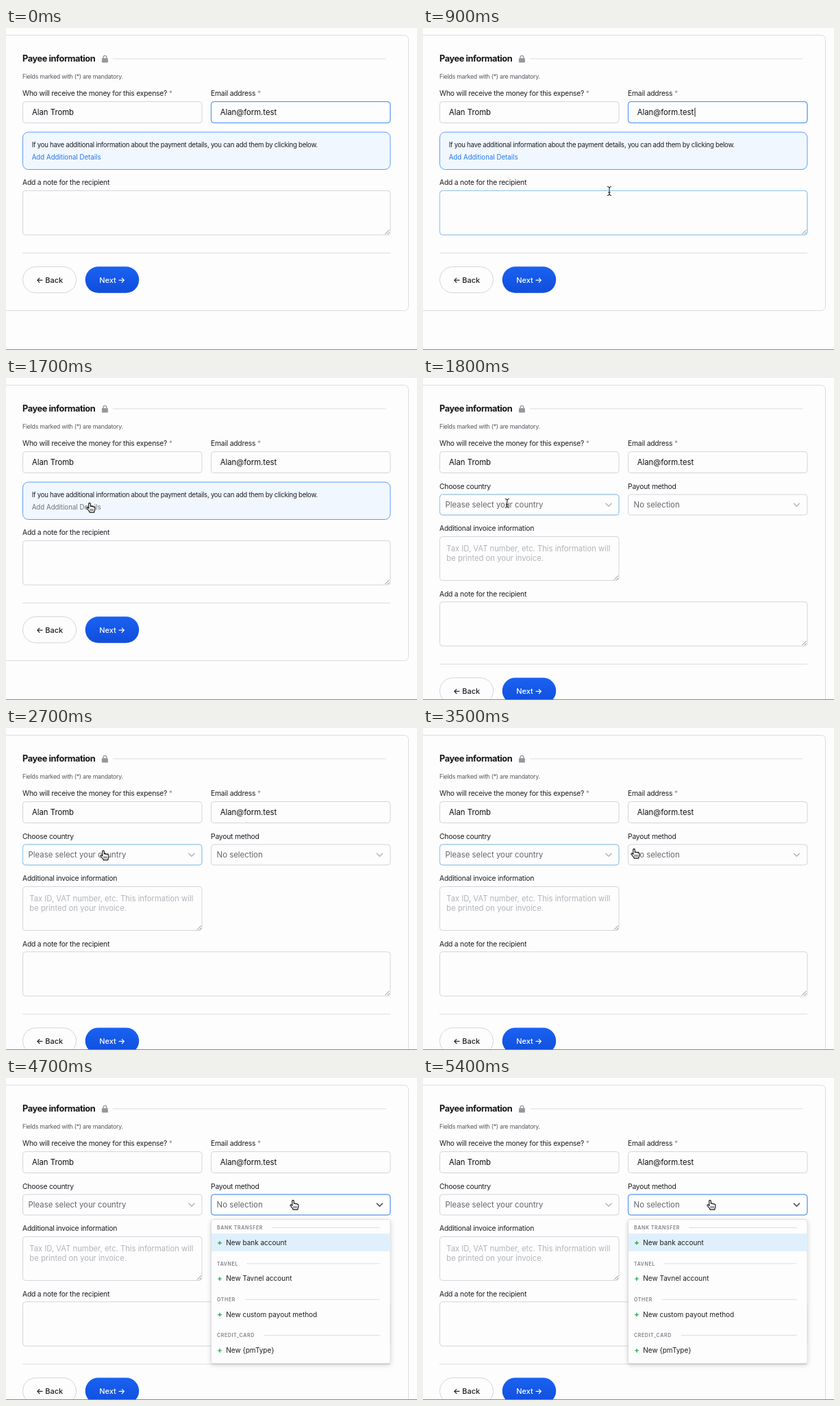
Animation of 600x470 px, one loop 5.5 s. Source, as an HTML page:

```html
<!DOCTYPE html>
<html lang="en">
<head>
<meta charset="utf-8">
<title>Payee form</title>
<style>
html, body { margin: 0; width: 100%; height: 100%; overflow: hidden; background: #fdfdfe; }
svg { display: block; width: 600px; height: 470px; }
text { font-family: Inter, "Liberation Sans", sans-serif; fill: #1c1e21; }
.title { font-size: 12.8px; font-weight: 700; letter-spacing: -.43px; fill: #141619; }
.hint { font-size: 8.8px; letter-spacing: -.26px; fill: #55585d; }
.label { font-size: 10.35px; letter-spacing: -.225px; }
.label tspan { fill: #8d9095; }
.value { font-size: 11.3px; fill: #0c0d0f; }
.pick { font-size: 11.37px; fill: #63666b; }
.ghost { font-size: 11.24px; fill: #b2b5b9; }
.info { font-size: 9.65px; letter-spacing: -.26px; }
.link { font-size: 9.7px; fill: #2178f0; }
.btn { font-size: 11px; font-weight: 500; }
.group { font-size: 7px; font-weight: 600; letter-spacing: .63px; fill: #7c7f84; }
.option { font-size: 10.03px; }
.line { stroke: #dadce0; fill: none; }
.box { fill: #fdfdfe; stroke: #d2d5d9; }
.hover { fill: none; stroke: #8cc5f0; }
.focus { fill: none; stroke: #3f8cf3; }
.chev { fill: none; stroke: #b4b7bb; stroke-width: 1.6; stroke-linecap: round; stroke-linejoin: round; }
.arrow { fill: none; stroke: #25272a; stroke-width: 1.2; stroke-linecap: round; stroke-linejoin: round; }
</style>
</head>
<body>
<svg id="stage" viewBox="0 0 600 470">
  <defs>
    <linearGradient id="blue" x1="0" y1="0" x2="0" y2="1">
      <stop offset="0" stop-color="#1a62f2"/><stop offset="1" stop-color="#104dda"/>
    </linearGradient>
    <filter id="shadow" x="-10%" y="-10%" width="120%" height="125%">
      <feDropShadow dx="0" dy="2" stdDeviation="3" flood-color="#000" flood-opacity=".18"/>
    </filter>
  </defs>
  <rect id="card" class="line" x="-12" y="10.5" width="599.5" height="402" rx="6"/>

  <text class="title" x="24" y="49.2">Payee information</text>
  <path d="M142 44.5v-1.7a2.4 2.4 0 0 1 4.8 0v1.7" fill="none" stroke="#95989c" stroke-width="1.3"/>
  <rect x="139.9" y="44" width="9" height="6.5" rx="1.2" fill="#95989c"/>
  <path class="line" d="M156 44.9H554.5"/>
  <text class="hint" x="24" y="74.4">Fields marked with (*) are mandatory.</text>
  <text class="label" x="24" y="98.8">Who will receive the money for this expense? <tspan>*</tspan></text>
  <text class="label" x="299" y="98.8">Email address <tspan>*</tspan></text>
  <rect class="box" x="24.5" y="107.5" width="261.5" height="31" rx="4"/>
  <rect class="box" x="299.5" y="107.5" width="261.5" height="31" rx="4"/>
  <rect id="emailFocus" class="focus" x="299.5" y="107.5" width="261.5" height="31" rx="4"/>
  <text class="value" x="38" y="127.1">Alan Tromb</text>
  <text class="value" x="312.7" y="127.1">Alan@form.test</text>
  <path id="caret" d="M397 116.5v13" stroke="#141619"/>

  <g id="notice">
    <rect x="24.5" y="152" width="536.5" height="54.5" rx="8" fill="#f1f7ff" stroke="#5d9ef3"/>
    <text class="info" x="37.7" y="174">If you have additional information about the payment details, you can add them by clicking below.</text>
    <text id="link" class="link" x="37.7" y="191.5">Add Additional Details</text>
  </g>

  <g id="details">
    <text class="label" x="24" y="161.5">Choose country</text>
    <text class="label" x="299" y="161.5">Payout method</text>
    <rect class="box" x="24.5" y="170" width="261.5" height="30" rx="4"/>
    <rect class="box" x="299.5" y="170" width="261.5" height="30" rx="4"/>
    <rect id="countryHover" class="hover" x="24.5" y="170" width="261.5" height="30" rx="4"/>
    <rect id="payoutHover" class="hover" x="299.5" y="170" width="261.5" height="30" rx="4"/>
    <rect id="payoutFocus" class="focus" x="299.5" y="170" width="261.5" height="30" rx="4"/>
    <text class="pick" x="32.6" y="189.1">Please select your country</text>
    <text class="pick" x="307.6" y="189.1">No selection</text>
    <path class="chev" d="M267 183.2l4 4 4-4"/>
    <path id="payoutChev" class="chev" d="M541.5 183.2l4 4 4-4"/>
    <text class="label" x="24" y="222.8">Additional invoice information</text>
    <rect class="box" x="24.5" y="231.5" width="261.5" height="64" rx="4"/>
    <path d="M279 294.5l6-6M282.5 294.5l2.5-2.5" stroke="#777" stroke-width=".9"/>
    <text class="ghost" x="34.3" y="252.6">Tax ID, VAT number, etc. This information will</text>
    <text class="ghost" x="34.3" y="266.6">be printed on your invoice.</text>
  </g>

  <g id="lower">
    <text class="label" x="24" y="229.4">Add a note for the recipient</text>
    <rect class="box" x="24.5" y="237.5" width="536.5" height="64.5" rx="4"/>
    <rect id="noteHover" class="hover" x="24.5" y="237.5" width="536.5" height="64.5" rx="4"/>
    <path d="M553.5 300.8l6-6M557 300.8l2.5-2.5" stroke="#777" stroke-width=".9"/>
    <path class="line" d="M24 328.5H561"/>
    <rect class="box" x="24.5" y="348.5" width="78" height="38" rx="19"/>
    <path class="arrow" d="M53 368.2H45.8M48.9 365.1l-3.1 3.1 3.1 3.1"/>
    <text class="btn" x="57.2" y="372">Back</text>
    <rect x="115.7" y="348.2" width="78.5" height="38.6" rx="19.3" fill="url(#blue)"/>
    <text class="btn" x="136.2" y="372" style="fill:#fff">Next</text>
    <path class="arrow" style="stroke:#fff" d="M165 368.2H172.4M169.3 365.1l3.1 3.1-3.1 3.1"/>
  </g>

  <g id="menu">
    <rect x="299.5" y="206.5" width="261.5" height="210" rx="3" fill="#fdfdfe" stroke="#d5d7da" stroke-width=".8" filter="url(#shadow)"/>
    <rect x="300" y="227" width="260.6" height="26" fill="#dff0fc"/>
  </g>
  <path d="M0 469.5H600" stroke="#858a88"/>

  <g id="ibeam" fill="none" stroke-linecap="round">
    <path d="M-2.6-6.5Q0-6.5 0-4.5V4.5Q0 6.5-2.6 6.5M2.6-6.5Q0-6.5 0-4.5M0 4.5Q0 6.5 2.6 6.5" stroke="#fff" stroke-width="2"/>
    <path d="M-2.6-6.5Q0-6.5 0-4.5V4.5Q0 6.5-2.6 6.5M2.6-6.5Q0-6.5 0-4.5M0 4.5Q0 6.5 2.6 6.5M-1.3 2H1.3" stroke="#111"/>
  </g>
  <g id="hand" stroke="#111" stroke-width="1.15" stroke-linejoin="round" stroke-linecap="round">
    <path fill="#fff" d="M-1.3 1.2C-1.3-.6 1.3-.6 1.3 1.2L1.5 5C1.8 4.2 3.6 4.2 3.8 5.4 4.3 4.6 5.8 4.8 6 6 6.6 5.4 7.9 5.8 7.9 7L7.7 10C7.5 11.5 6.8 12 6.8 13.6H.2C0 12-2 10.5-3.8 8-4.6 6.8-3 5.8-1.9 7L-1.1 8Z"/>
    <path d="M1.1 8.7v2.6M3.1 8.7v2.6M5.1 8.7v2.6" stroke-width=".8"/>
  </g>
  <path id="pointer" d="M0 0V12.2L2.8 9.6 4.7 14 6.7 13.1 4.8 8.9H8.6Z" fill="#111" stroke="#fff" stroke-width=".9"/>
</svg>
<script>
const LOOP = 5500, STEP = 100;
const $ = id => document.getElementById(id);

// start, cursor, x, y
const moves = [
  [0, "", 0, 0],
  [400, "pointer", 312, 324], [500, "ibeam", 302, 296], [600, "ibeam", 292, 274],
  [700, "ibeam", 282, 256], [800, "ibeam", 275, 244], [900, "ibeam", 272, 238],
  [1000, "pointer", 236, 224], [1100, "pointer", 178, 206],
  [1200, "hand", 135, 187], [1300, "hand", 122, 182.5], [1800, "ibeam", 122.8, 182.8],
  [2700, "hand", 142, 179], [2800, "hand", 192, 179], [2900, "hand", 219, 179],
  [3200, "hand", 227, 179], [3300, "hand", 248, 178], [3400, "hand", 277, 177],
  [3500, "hand", 308, 176.5], [3600, "hand", 375, 177.5], [3700, "hand", 419, 178.5]
];

function buildMenu() {
  const rows = [
    ["BANK TRANSFER", "bank account", 388], ["TAVNEL", "Tavnel account", 351],
    ["OTHER", "custom payout method", 349], ["CREDIT_CARD", "{pmType}", 377]
  ];
  $("menu").innerHTML += rows.map(([group, name, x], i) => {
    const y = 218.5 + i * 52.4;
    return `<text class="group" x="308" y="${y + 2.6}">${group}</text>
      <path class="line" d="M${x} ${y}H545.5"/>
      <path d="M309.2 ${y + 22.2}h5.6m-2.8-2.8v5.6" stroke="#27ae52" stroke-width="1.4"/>
      <text class="option" x="321.2" y="${y + 25.3}">New ${name}</text>`;
  }).join("");
}

const show = (id, on) => $(id).style.opacity = +on;
const ramp = (t, from) => Math.max(0, Math.min(1, (t - from) / 200));
const pulse = (t, on, off) => ramp(t, on) - ramp(t, off);

function draw(t) {
  const open = t >= 1800, menu = t >= 4700;
  show("notice", !open);
  show("details", open);
  show("menu", menu);
  $("lower").setAttribute("transform", `translate(0 ${open ? 89.2 : 0})`);
  $("card").setAttribute("height", open ? 492 : 402);

  show("emailFocus", t < 1700);
  show("caret", t < 1700 && t % 1000 >= 500);
  show("noteHover", pulse(t, 400, 900));
  show("countryHover", open ? 1 - ramp(t, 3500) : 0);
  show("payoutHover", menu ? 0 : ramp(t, 3500));
  show("payoutFocus", menu);
  $("payoutChev").style.stroke = menu ? "#45484c" : "";
  $("link").style.fill = t >= 1200 ? "#6f7277" : "";

  const [, kind, x, y] = moves.findLast(m => m[0] <= t);
  for (const id of ["pointer", "ibeam", "hand"]) {
    show(id, id === kind);
    $(id).setAttribute("transform", `translate(${x} ${y})`);
  }
}

buildMenu();
const start = performance.now();
function tick() {
  const t = (performance.now() - start) % LOOP;
  draw(Math.floor(t / STEP) * STEP);
  requestAnimationFrame(tick);
}
tick();
</script>
</body>
</html>
```
